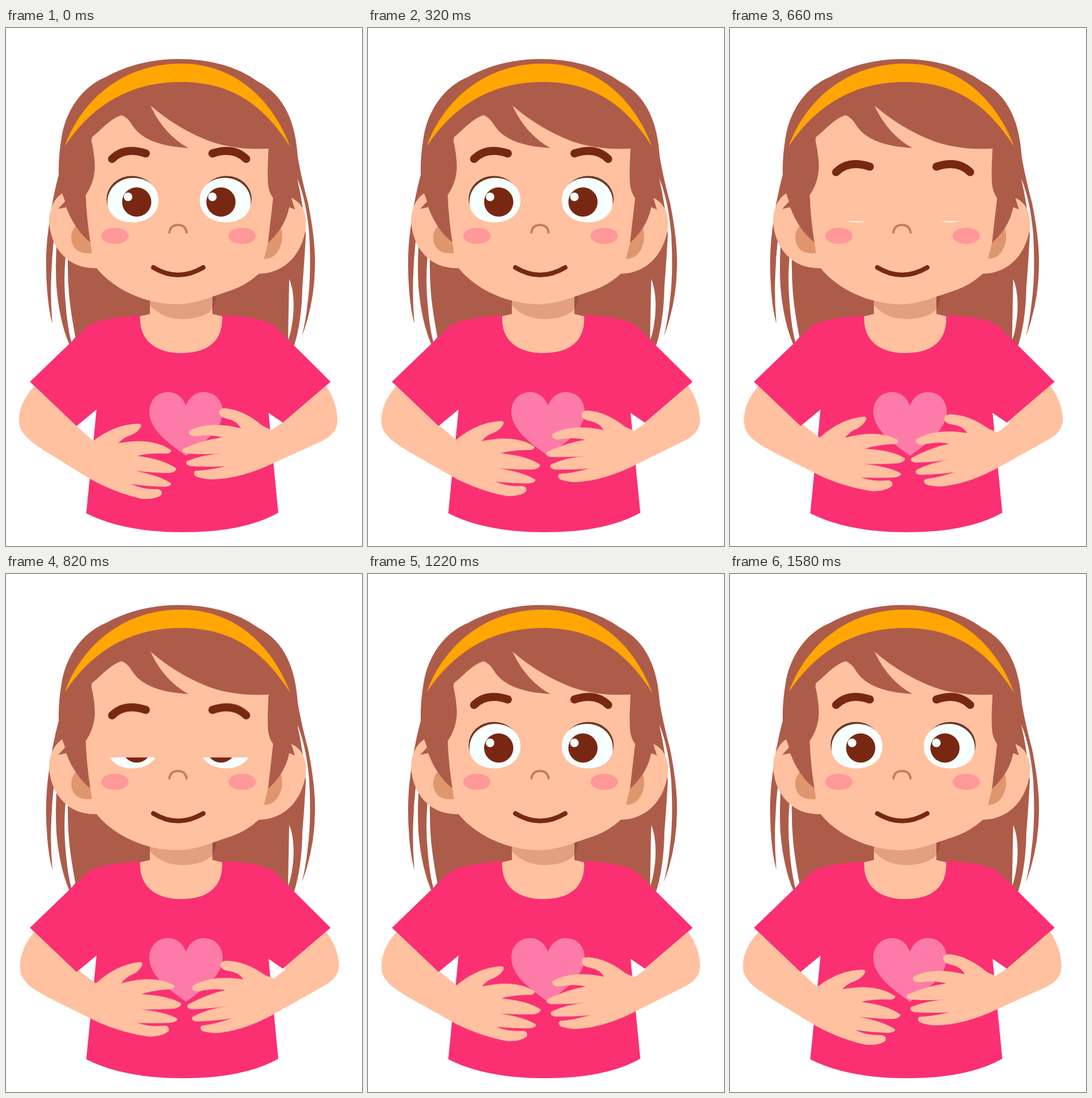
These frames come from a looping animation (621 px wide and 902 px high, 1600 ms). An HTML page without scripts:

```html
<!DOCTYPE html>
<html lang="en">
<head>
<meta charset="utf-8">
<title>Girl rubbing her tummy</title>
<style>
  html, body { margin: 0; width: 100%; height: 100%; overflow: hidden; background: #fff; }
  svg { display: block; width: 621px; height: 902px; }
  .hair { fill: #ae5c4a; }
  .gap { fill: #fff; }
  .skin { fill: #ffc1a0; }
  .shade { fill: #e0966c; }
  .shirt { fill: #fa3072; }
  .dark { fill: #782812; }
  .line { fill: none; stroke: #782812; stroke-linecap: round; }
  .cheek { fill: #ff9898; }

  .arm { animation: .8s cubic-bezier(.37, 0, .63, 1) infinite alternate; }
  .left { transform-origin: 85px 662px; animation-name: rub-left; }
  .right { transform-origin: 515px 650px; animation-name: rub-right; }
  @keyframes rub-left { to { transform: rotate(-5.15deg); } }
  @keyframes rub-right { to { transform: rotate(-4.95deg); } }

  .lid, .brows { animation: 1.6s cubic-bezier(.37, 0, .63, 1) infinite; }
  .lid { transform-origin: 0 256px; animation-name: blink; }
  .brows { animation-name: frown; }
  @keyframes blink {
    0%, 22%, 60%, 100% { transform: scaleY(0); }
    34.75%, 47.5% { transform: scaleY(1); }
  }
  @keyframes frown {
    0%, 22%, 60%, 100% { transform: translateY(0); }
    34.75%, 47.5% { transform: translateY(23px); }
  }
</style>
</head>
<body>
<svg viewBox="0 0 621 902">
  <!-- hair -->
  <path class="hair" d="M300 54C250 54 205 68 175 85C132 102 104 145 97 190Q91 225 92 255Q80 300 74 350Q67 400 72 460Q75 495 81 515Q77 470 79 430Q80 400 83 372L88 380Q86 420 88 450Q93 510 110 550L130 560H490L503 552Q516 510 517 450Q521 400 523 360Q519 310 508 262Q524 300 529 360Q533 430 526 480Q523 510 516 537Q538 480 539 415Q540 370 527 305Q515 260 509 225C505 165 487 118 439 93Q385 54 300 54Z"/>
  <path class="gap" d="M104 396Q100 440 104 480Q107 520 114 547L121 538Q113 495 110 465Q107 430 108 396Z"/>
  <path class="gap" d="M494 437Q504 460 501 500Q498 530 492 543Z"/>
  <path fill="#9a5040" d="M358 462L367 465Q366 482 358 492Z"/>
  <path fill="#ffa602" d="M103 205C130 130 200 62 305 62C400 62 465 125 496 207C450 135 395 94 305 94C215 94 150 135 103 205Z"/>

  <!-- ears and face -->
  <path class="skin" d="M98 288C80 299 73 325 76 345C81 385 110 421 160 418L150 300Z"/>
  <path class="skin" d="M498 296C518 305 525 325 523 348C517 390 490 427 441 428L460 300Z"/>
  <path class="shade" d="M122 344Q112 355 114 370Q119 395 150 392L148 350Z"/>
  <path class="shade" d="M479 347Q483 358 481 372Q474 402 450 402L456 350Z"/>
  <path class="hair" d="M98 240V288L103 302L91 315L105 312Q120 352 147 373L160 240Z"/>
  <path class="hair" d="M505 240L498 297L504 316L494 312Q487 348 456 375L440 240Z"/>

  <!-- shirt and neck -->
  <path class="shirt" d="M234 501Q175 503 145 517L42 616L123 693L158 664L140 845Q205 878 308 878Q415 878 475 844L458 670L483 687L566 616L466 517Q440 502 377 500Z"/>
  <path class="skin" d="M251 455V498L234 502C232 545 262 566 306 566C352 566 379 545 377 502L360 498V455Z"/>
  <path fill="#e2a080" d="M251 470V483Q273 507 308 507Q344 506 360 490V460Z"/>
  <path class="skin" d="M150 190Q160 182 168 174Q190 154 202 152Q212 155 222 172Q245 205 318 209Q275 185 252 135Q298 175 355 197Q400 213 458 210Q455 262 458 278Q461 290 466 296L457 374L450 402L441 428Q420 447 395 456L360 468Q325 481 297 481C240 480 187 454 158 418L150 392L147 372Q141 335 139 291Q155 268 155 240Q154 217 149 196Z"/>
  <path fill="#fd7ba8" d="M314 658C309 643 297 634 283 634C264 634 250 648 250 668C250 700 285 724 314 745C343 724 378 700 378 668C378 648 364 634 345 634C331 634 319 643 314 658Z"/>

  <!-- eyes -->
  <g id="eye">
    <ellipse fill="#6b3a26" cx="219.5" cy="297.5" rx="44" ry="40"/>
    <path fill="#f8ffff" d="M177 303C177 278 198 261 222 261C247 261 266 277 266 300C266 325 245 338.500 220 338.500C196 338.500 177 325 177 303Z"/>
  </g>
  <use href="#eye" transform="translate(604) scale(-1 1)"/>
  <g class="dark">
    <circle cx="228" cy="303" r="25.5"/>
    <circle cx="375" cy="303" r="25.5"/>
  </g>
  <g fill="#f8ffff">
    <circle cx="213" cy="294" r="7.5"/>
    <circle cx="360" cy="294" r="7.5"/>
  </g>
  <path class="skin lid" d="M170 256H434V336.500H170Z"/>
  <g class="line brows" stroke-width="14">
    <path d="M185 228Q207 206 244 218.500"/>
    <path d="M360 218.500Q397 206 419 228"/>
  </g>

  <!-- nose, mouth, cheeks -->
  <ellipse class="cheek" cx="190" cy="362" rx="24" ry="14"/>
  <ellipse class="cheek" cx="412" cy="362" rx="24" ry="14"/>
  <path class="line" style="stroke:#c97b5a" stroke-width="4" d="M285 356Q287 343 300 343Q313 343 315 356"/>
  <path class="line" stroke-width="8" d="M257 417Q300 443 344 417"/>

  <!-- arms, tucked under the sleeves -->
  <path class="skin arm left" d="M75 600C38 630 20 658 23 690C28 712 50 724 70 738L150 787Q195 811 238 820Q262 821 271 813Q274 804 264 803Q240 804 218 794Q245 798 275 799Q289 798 288 793Q270 780 225 771Q260 775 285 775Q298 773 297 767Q275 751 229 745Q250 740 280 741Q289 740 288 735Q255 712 196 723Q206 712 218 709Q230 704 235 695Q238 689 230 689Q190 690 152 719L123 693L110 640Z"/>
  <path class="skin arm right" d="M540 600Q577 640 578 680C580 705 560 715 545 722L468 757Q410 785 360 786Q345 786 332 781Q325 776 330 771Q355 770 383 763Q355 765 322 763Q311 760 316 754Q345 742 380 741Q345 743 315 741Q304 738 310 732Q345 717 377 713Q360 707 328 711Q317 709 320 701Q355 683 410 697Q402 684 388 681Q371 678 372 668Q374 662 382 662Q415 665 448 693L463 700L483 687L500 620Z"/>
  <path class="shirt" d="M145 517L42 616L123 693L158 664V517Z"/>
  <path class="shirt" d="M466 517L566 616L483 687L458 670V517Z"/>
</svg>
</body>
</html>
```
